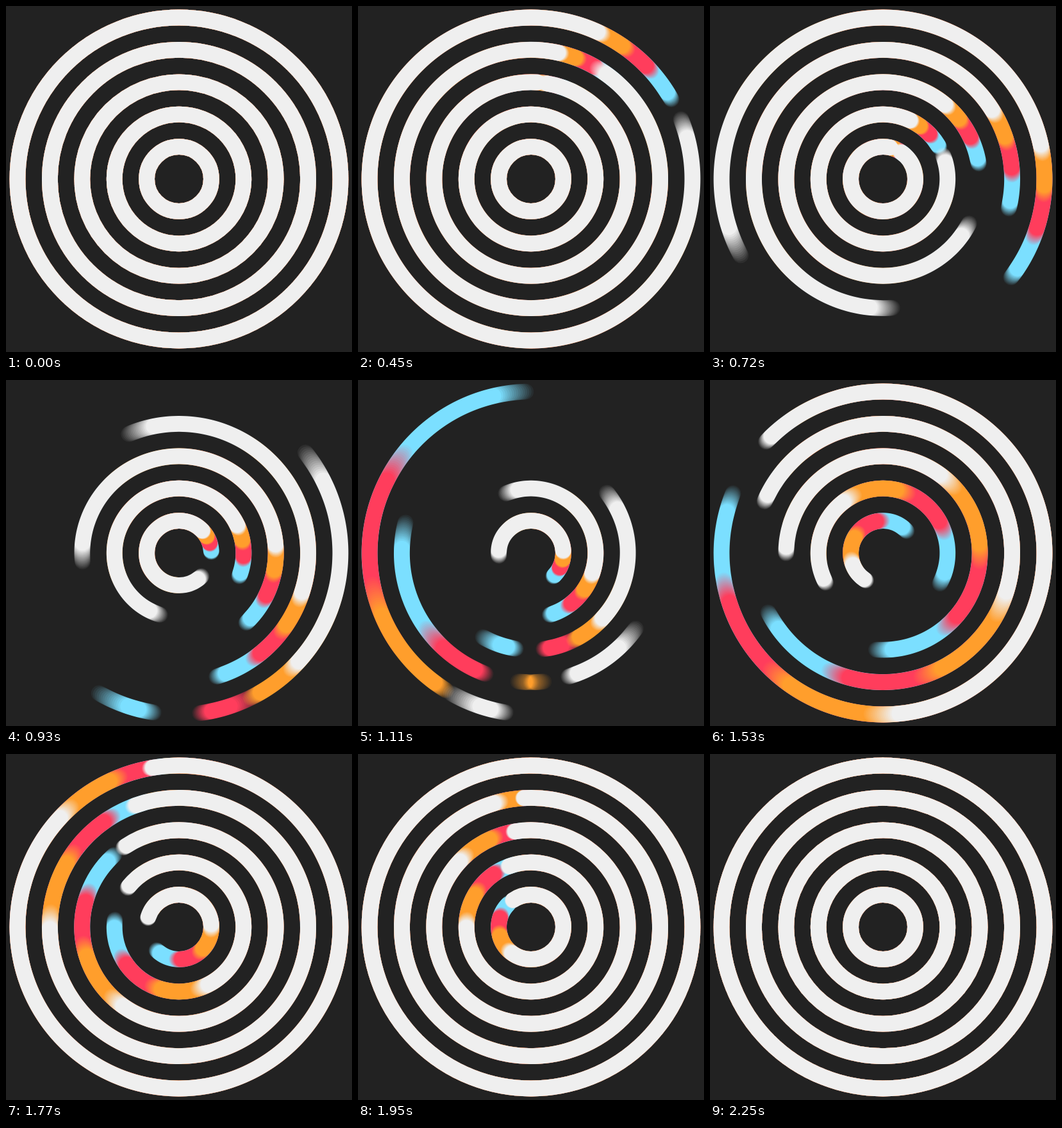
An HTML page with a canvas for the animation above (2.28 s loop, 540 by 540 pixels).

```html
<!DOCTYPE html>
<html lang="en">
<head>
<meta charset="utf-8">
<title>Rings</title>
<style>
  html, body { margin: 0; width: 100%; height: 100%; overflow: hidden; background: #222; }
  canvas { display: block; width: 100vmin; height: 100vmin; }
</style>
</head>
<body>
<canvas id="stage" width="540" height="540"></canvas>
<script>
const SIZE = 540, LOOP = 2280, STEP = 30;
const RINGS = 5, RING_GAP = 50.4, WIDTH = 24.8;
const RING_DELAY = 90, COLOR_DELAY = 60, START = 180, HALF = 900;
const SHUTTER = 15, SAMPLES = 16;
const COLORS = ['#7bdfff', '#ff3d5c', '#ff9e2c', '#efefef']; // bottom to top

const ctx = document.getElementById('stage').getContext('2d');
const layer = document.createElement('canvas');
layer.width = layer.height = SIZE;
const pen = layer.getContext('2d');

function bezier(x1, y1, x2, y2) {
  const at = (a, b, s) => 3 * a * s * (1 - s) ** 2 + 3 * b * s * s * (1 - s) + s ** 3;
  return p => {
    if (p <= 0) return 0;
    if (p >= 1) return 1;
    let lo = 0, hi = 1;
    for (let i = 0; i < 22; i++) {
      const mid = (lo + hi) / 2;
      if (at(x1, x2, mid) < p) lo = mid; else hi = mid;
    }
    return at(y1, y2, lo);
  };
}

// Both ends make two turns and meet at the bottom halfway through.
const tailIn = bezier(.333, 0, .667, .56);
const tailOut = bezier(.333, .667, .667, 1);
const headIn = bezier(.29, .01, .72, .54);
const headOut = bezier(.333, .44, .667, 1);

const tailAt = p => 540 * tailIn(p) + 180 * tailOut(p - 1);
const headAt = p => 360 + 180 * headIn(p) + 540 * headOut(p - 1);
const rad = deg => (deg - 90) * Math.PI / 180;

function drawRing(k, time) {
  const p = (time - START) / HALF;
  const tail = tailAt(p);
  const head = Math.max(headAt(p), tail + 0.05);
  pen.beginPath();
  pen.arc(SIZE / 2, SIZE / 2, RING_GAP * (RINGS - k), rad(tail), rad(head));
  pen.stroke();
}

function drawLayer(color, time) {
  pen.globalCompositeOperation = 'source-over';
  pen.globalAlpha = 1;
  pen.clearRect(0, 0, SIZE, SIZE);

  // Motion blur: add up evenly spaced moments within the shutter time.
  pen.globalCompositeOperation = 'lighter';
  pen.globalAlpha = 1 / SAMPLES;
  pen.strokeStyle = '#fff';
  pen.lineWidth = WIDTH;
  pen.lineCap = 'round';
  for (let i = 0; i < SAMPLES; i++) {
    const shift = ((i + 0.5) / SAMPLES - 0.5) * SHUTTER;
    for (let k = 0; k < RINGS; k++) drawRing(k, time + shift - k * RING_DELAY);
  }

  pen.globalCompositeOperation = 'source-in';
  pen.globalAlpha = 1;
  pen.fillStyle = color;
  pen.fillRect(0, 0, SIZE, SIZE);
  ctx.drawImage(layer, 0, 0);
}

function draw(time) {
  ctx.fillStyle = '#222';
  ctx.fillRect(0, 0, SIZE, SIZE);
  COLORS.forEach((color, i) => {
    drawLayer(color, time + (COLORS.length - 1 - i) * COLOR_DELAY);
  });
}

const begin = performance.now();
let shown = -1;
function tick() {
  const t = Math.max(0, performance.now() - begin) % LOOP;
  const time = Math.floor(t / STEP) * STEP;
  if (time !== shown) draw(shown = time);
  requestAnimationFrame(tick);
}
tick();
</script>
</body>
</html>
```
